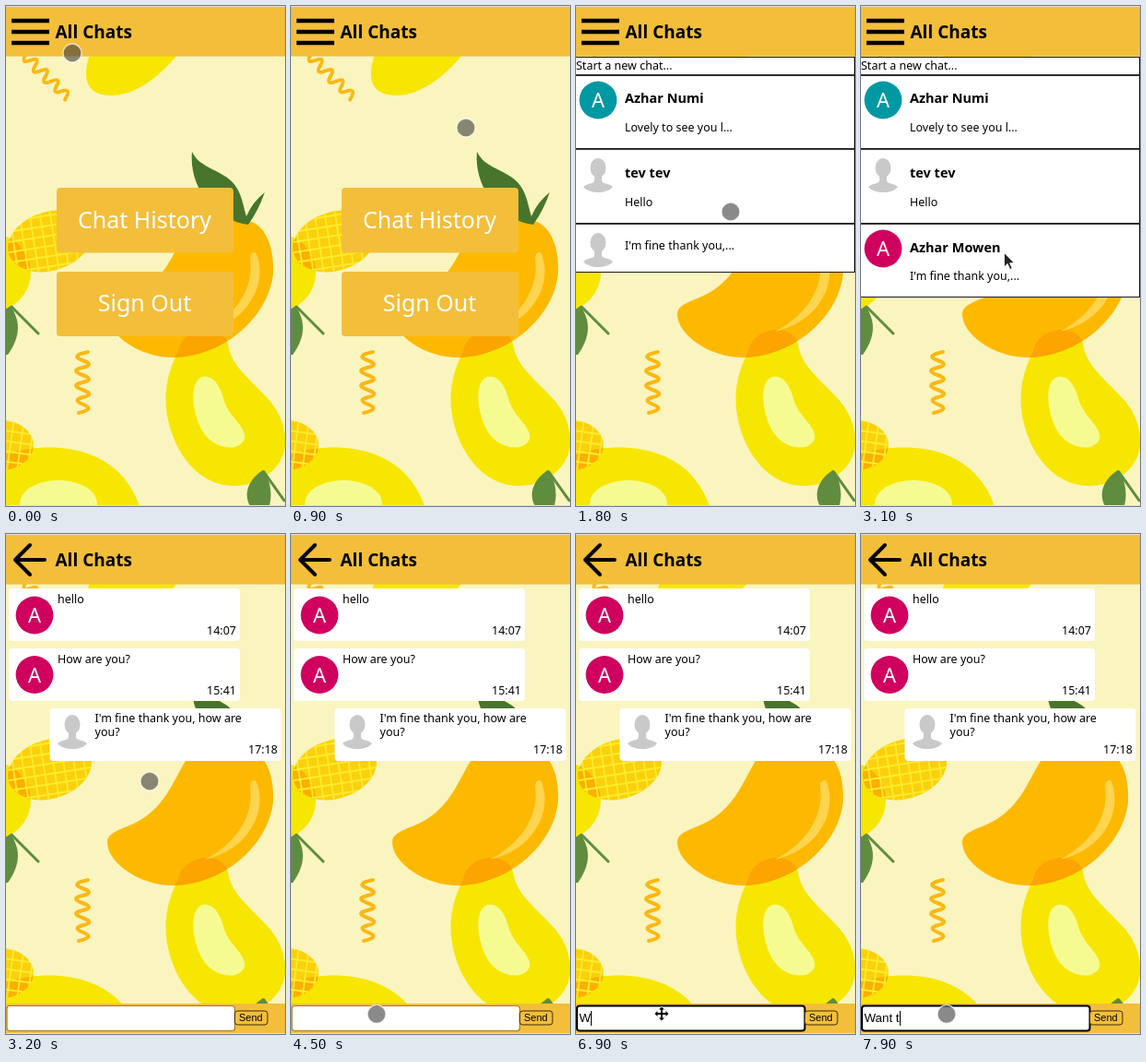
An HTML page that plays this animation: 303x542 px, repeating every 8 s.

```html
<!DOCTYPE html>
<html lang="en">
<head>
<meta charset="utf-8">
<title>Chat walkthrough</title>
<style>
  html, body { margin: 0; width: 100%; height: 100%; overflow: hidden; background: #faf5bf; }
  svg { display: block; width: 303px; height: 542px; }
  text { font: 12.5px "Noto Sans", "Open Sans", sans-serif; fill: #000; white-space: pre; }
  .title { font-size: 19px; font-weight: 700; }
  .name { font-size: 14.5px; font-weight: 700; }
  .big { font-size: 25px; fill: #fff; text-anchor: middle; }
  .initial { font-size: 22px; fill: #fff; text-anchor: middle; }
  .time { text-anchor: end; }
  .ui { font: 11px "Liberation Sans", Arial, sans-serif; }
  #typed { font-size: 13.333px; }
  .gold { fill: #f3be3a; }
  .yellow { fill: #f7e600; }
  .pale { fill: #f5fb90; }
  .dark { fill: #48752c; }
  .leaf { fill: #5f8c3f; }
  .stem { fill: none; stroke: #5f8c3f; stroke-width: 3; stroke-linecap: round; }
  .row { fill: #fff; stroke: #1a1a1a; }
  .bubble { fill: #fff; }
</style>
</head>
<body>
<svg viewBox="0 0 303 542">
  <defs>
    <path id="mango" d="M110 335C109 326 119 322 134 316C172 300 180 270 195 246C208 226 245 222 271 236C286 246 291 268 290 290C286 335 240 378 184 381C146 382 111 357 110 335Z"/>
    <path id="pear" d="M187 374C193 346 236 344 241 366C244 389 264 404 282 423C299 441 304 457 303 478C299 505 271 522 243 520C206 517 182 482 175 444C171 420 175 398 187 374Z"/>
    <ellipse id="corn" rx="46.5" ry="32" transform="translate(47.5 255) rotate(-17)"/>
    <ellipse id="cob" cx="-5" cy="476" rx="35" ry="27"/>
    <circle id="lemon" cx="-15" cy="289" r="42"/>
    <path id="melon" d="M-1 486C50 470 122 476 145 542H-1Z"/>
    <path id="squiggle" d="M89 375Q69 379 83 384T83 392T83 400T83 408T83 416T84 424T84 432T79 441" fill="none" stroke="#fdb813" stroke-width="4" stroke-linecap="round"/>
    <g id="person" fill="#c9c9c9">
      <ellipse cy="-7.5" rx="8.5" ry="10.5"/>
      <path d="M-16 13C-12 9-4 10-4 6V-1H4V6C4 10 12 9 16 13C10 21-10 21-16 13Z"/>
    </g>
    <pattern id="grid" width="11" height="11" patternUnits="userSpaceOnUse" patternTransform="rotate(8)">
      <path d="M0 5H11M5 0V11" stroke="#ffec2c" stroke-width="1.8"/>
    </pattern>
    <clipPath id="inMango"><use href="#mango"/></clipPath>
    <clipPath id="inCorn"><use href="#corn"/></clipPath>
    <clipPath id="inCob"><use href="#cob"/></clipPath>
  </defs>

  <g id="wallpaper">
    <rect width="303" height="542" fill="#faf5bf"/>
    <use href="#squiggle"/>
    <use href="#squiggle" transform="translate(43 76) rotate(-45) scale(.85 1) translate(-83 -408)"/>
    <path class="yellow" d="M91 52C83 76 85 96 113 97C141 97 165 78 187 52Z"/>
    <use href="#lemon" class="yellow"/>
    <use href="#corn" fill="#fbd00c"/>
    <use href="#lemon" fill="#fcb000" clip-path="url(#inCorn)"/>
    <use href="#corn" fill="url(#grid)"/>
    <path class="leaf" d="M5 325C16 342 16 358 2 378H-2V330Z"/>
    <path class="stem" d="M6 326L35 355"/>
    <use href="#melon" class="yellow"/>
    <use href="#cob" fill="#fbd00c"/>
    <use href="#melon" fill="#fcb000" clip-path="url(#inCob)"/>
    <use href="#cob" fill="url(#grid)"/>
    <ellipse class="pale" cx="57" cy="539" rx="42" ry="25"/>
    <use href="#pear" class="yellow"/>
    <use href="#mango" fill="#fdb900"/>
    <use href="#pear" fill="#fca400" clip-path="url(#inMango)"/>
    <path d="M271 267C284 292 271 340 216 353C249 336 270 306 265 273Q266 266 271 267Z" fill="#ffd44e"/>
    <path class="pale" d="M213 402C199 407 201 440 214 462C228 482 252 483 259 470C262 455 241 446 236 425C231 406 222 400 213 402Z"/>
    <path class="dark" d="M202 158C211 176 230 176 245 190C256 201 257 215 261 228Q268 212 281 202Q274 222 263 237C246 235 233 226 220 212C207 199 200 178 202 158Z"/>
    <path class="leaf" d="M279 503C262 514 258 530 265 542H286C290 526 286 512 279 503Z"/>
    <path class="stem" d="M280 505L302 536"/>
  </g>

  <rect class="gold" width="303" height="54.6"/>
  <text class="title" x="53.5" y="35">All Chats</text>
  <path id="menu" d="M6 16H47M6 28H47M6 40H47" stroke="#000" stroke-width="4.6"/>
  <path id="back" d="M26 12L10 28L26 44M10 28H42" fill="none" stroke="#000" stroke-width="4" stroke-linecap="round" stroke-linejoin="round"/>

  <g id="home">
    <rect class="gold" x="55" y="197" width="192" height="70.5" rx="4"/>
    <rect class="gold" x="55" y="288" width="192" height="70" rx="4"/>
    <text class="big" x="150.5" y="241">Chat History</text>
    <text class="big" x="150.5" y="331">Sign Out</text>
  </g>

  <g id="list">
    <rect class="row" x="-.5" y="55.5" width="303" height="19.5"/>
    <text x="0" y="69">Start a new chat...</text>
    <rect class="row" x="-.5" y="75" width="303" height="80"/>
    <circle cx="24" cy="102" r="20.4" fill="#0098a3"/>
    <text class="initial" x="24" y="110">A</text>
    <text class="name" x="53" y="105">Azhar Numi</text>
    <text x="53" y="136">Lovely to see you l...</text>
    <rect class="row" x="-.5" y="155" width="303" height="81"/>
    <use href="#person" x="24" y="183"/>
    <text class="name" x="53" y="186">tev tev</text>
    <text x="53" y="217">Hello</text>
    <rect class="row" id="lastRow" x="-.5" y="236" width="303" height="79.5"/>
    <path d="M0 75H303M0 155H303M0 236H303" stroke="#1a1a1a" stroke-width="1.6"/>
    <use href="#person" id="loading" x="24" y="264"/>
    <g id="loaded">
      <circle cx="24" cy="263" r="20.4" fill="#d0005f"/>
      <text class="initial" x="24" y="271">A</text>
      <text class="name" x="53" y="267">Azhar Mowen</text>
    </g>
    <text id="lastLine" x="53">I'm fine thank you,...</text>
  </g>

  <g id="chat">
    <rect class="bubble" x="3" y="59" width="251" height="57" rx="4"/>
    <rect class="bubble" x="3" y="124" width="251" height="57" rx="4"/>
    <rect class="bubble" x="47.5" y="189" width="251" height="57" rx="4"/>
    <circle cx="31" cy="88" r="20.4" fill="#d0005f"/>
    <circle cx="31" cy="152.5" r="20.4" fill="#d0005f"/>
    <text class="initial" x="31" y="96">A</text>
    <text class="initial" x="31" y="160.5">A</text>
    <use href="#person" x="72" y="214"/>
    <text x="56" y="75">hello</text>
    <text x="56" y="140">How are you?</text>
    <text x="96.5" y="204">I'm fine thank you, how are</text>
    <text x="96.5" y="219">you?</text>
    <text class="time" x="250" y="109">14:07</text>
    <text class="time" x="250" y="174">15:41</text>
    <text class="time" x="295" y="238">17:18</text>
    <rect class="gold" y="509" width="303" height="33"/>
    <rect id="field" x="1" y="511.5" width="247.5" height="27" rx="3" fill="#fff"/>
    <text class="ui" id="typed" x="3.5" y="529"></text>
    <path id="caret" d="M0 517V533" stroke="#000"/>
    <rect class="gold" x="248.5" y="517" width="35.5" height="15" rx="3" stroke="#3a2d0c"/>
    <text class="ui" x="253" y="528">Send</text>
  </g>

  <path d="M0 .5H303M0 541.5H303" stroke="#e2e2de"/>
  <g id="cursor">
    <circle id="touch" r="10" fill="#3c3c3c" fill-opacity=".6" stroke="#fff" stroke-opacity=".7" stroke-width="1.3"/>
    <path id="arrow" d="M0 0V15.5L3.6 12L6.2 18L8.7 17L6.2 11.2H11Z" fill="#222" stroke="#fff" stroke-width=".9"/>
    <path id="move" d="M0-7.5L3-4.5H1V-1H4.5V-3L7.5 0L4.5 3V1H1V4.5H3L0 7.5L-3 4.5H-1V1H-4.5V3L-7.5 0L-4.5-3V-1H-1V-4.5H-3Z" fill="#000" stroke="#fff" stroke-width="1.2" paint-order="stroke"/>
  </g>
</svg>
<script>
const LOOP = 8000;
const $ = id => document.getElementById(id);
const show = (id, on) => { $(id).style.display = on ? '' : 'none'; };
const set = (id, attrs) => { for (const k in attrs) $(id).setAttribute(k, attrs[k]); };

// [start ms, x, y, shape]
const pointer = [
  [0, 72, 51, 'touch'], [500, 85, 73, 'touch'],
  [700, 104, 70, 'touch'], [800, 150, 92, 'touch'], [900, 190, 132, 'touch'],
  [1000, 207, 178, 'touch'], [1100, 188, 213, 'touch'], [1200, 168, 223, 'touch'],
  [1600, 167.5, 222.5, 'arrow'], [1800, 168, 223, 'touch'],
  [2300, 165, 254, 'touch'], [2600, 163, 257, 'touch'], [2700, 160, 261, 'touch'],
  [2800, 157, 265, 'touch'], [2900, 156, 268, 'touch'],
  [3100, 155.5, 267.5, 'arrow'], [3200, 156, 268, 'touch'],
  [3900, 122, 400, 'touch'], [4000, 93, 493, 'touch'],
  [4200, 271, 503, 'touch'], [4300, 117, 512, 'touch'], [4500, 93, 520.5, 'touch'],
  [5700, 93, 520, 'move'], [6200, 93, 520.5, 'touch'],
  [6500, 93, 520, 'move'], [7000, 93, 520.5, 'touch']
];
const message = 'Want t';
const keyTimes = [6900, 7000, 7500, 7600, 7700, 7900];
const within = (t, a, b) => t >= a && t < b;

function draw(t) {
  const opened = t >= 3200, loaded = t >= 2000, focused = t >= 4900;
  show('menu', !opened);
  show('back', opened);
  show('home', t < 1800);
  show('list', within(t, 1800, 3200));
  show('chat', opened);

  show('loading', !loaded);
  show('loaded', loaded);
  set('lastRow', { height: loaded ? 79.5 : 52.5 });
  set('lastLine', { y: loaded ? 297 : 264 });

  set('field', { stroke: focused ? '#000' : '#a87c1c', 'stroke-width': focused ? 2 : 1.2 });
  const typed = message.slice(0, keyTimes.filter(k => t >= k).length);
  $('typed').textContent = typed;
  const width = typed ? $('typed').getComputedTextLength() : 0;
  set('caret', { transform: `translate(${Math.round(3.5 + width) + .5} 0)` });
  show('caret', within(t, 4900, 5300) || within(t, 5900, 6400) || t >= 6900);

  const [, x, y, shape] = pointer.findLast(p => t >= p[0]);
  set('cursor', { transform: `translate(${x} ${y})` });
  for (const id of ['touch', 'arrow', 'move']) show(id, id === shape);
}

function tick() {
  draw(performance.now() % LOOP);
  requestAnimationFrame(tick);
}
tick();
</script>
</body>
</html>
```
